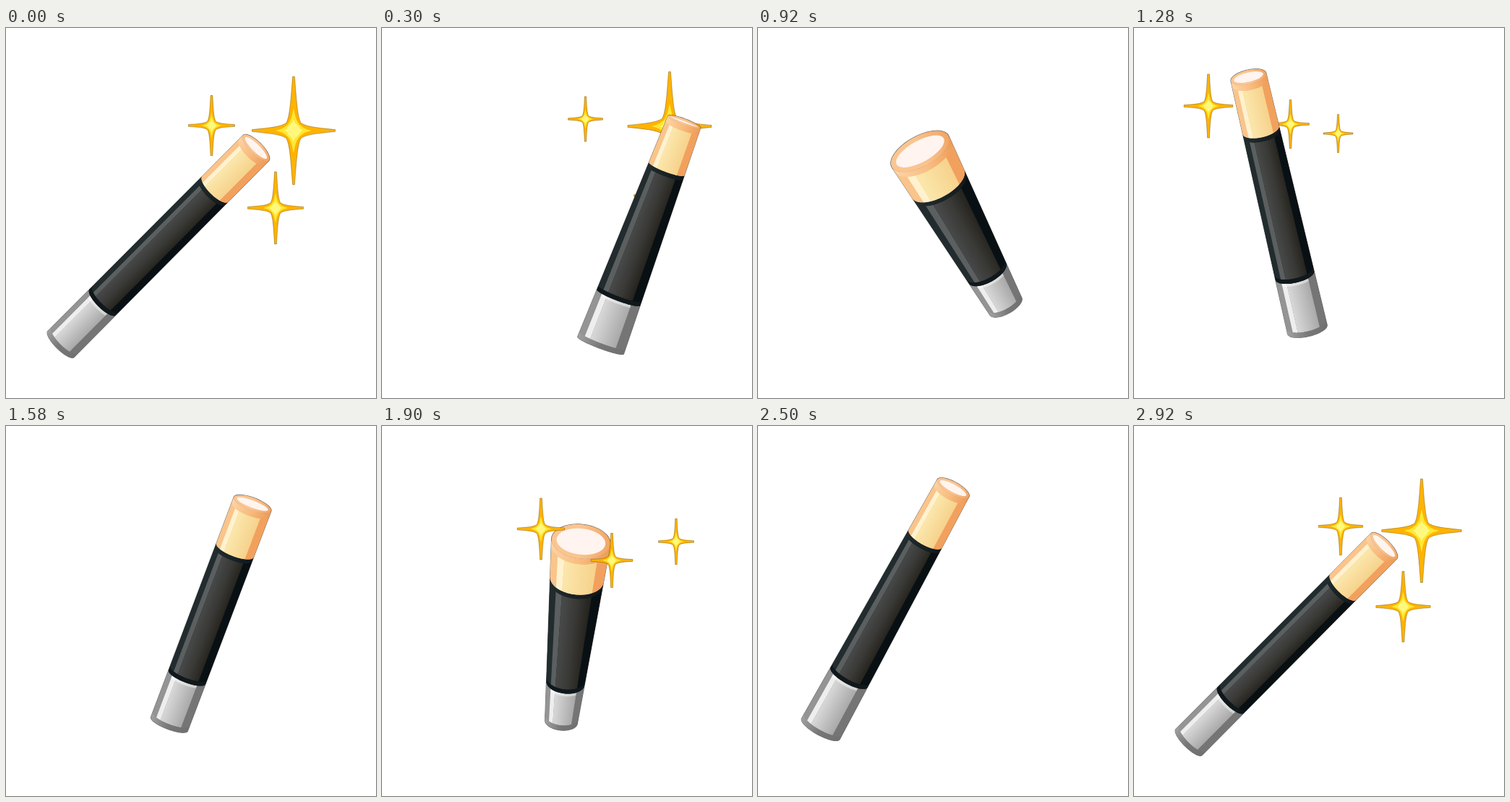
An HTML page with a canvas that plays this animation: 512x512 px, repeating every 2940 ms.

```html
<!DOCTYPE html>
<html lang="en">
<head>
<meta charset="utf-8">
<title>Magic wand</title>
<style>
html, body { margin: 0; width: 100%; height: 100%; overflow: hidden; background: #fff; }
canvas { display: block; width: 512px; height: 512px; }
</style>
</head>
<body>
<canvas id="stage"></canvas>
<script>
const LOOP = 2940;
const canvas = document.getElementById('stage');
const ctx = canvas.getContext('2d');
const dpr = window.devicePixelRatio || 1;
canvas.width = canvas.height = 512 * dpr;

// time, tip x, tip y, tip radius, base x, base y, base radius, ellipse ratio
const REST = [346, 166, 25, 76, 437.5, 25.5, 0.35];
const WAND = [
  [0, ...REST],
  [300, 418, 130, 24, 302, 439, 34, 0.18],
  [400, 441, 142, 28, 328, 444, 33, 0.25],
  [560, 392, 185, 38, 345, 405, 25, 0.42],
  [740, 305, 205, 46, 352, 385, 25, 0.52],
  [920, 225, 171, 45, 343, 385, 25, 0.47],
  [1080, 112, 108, 32, 295, 402, 26, 0.42],
  [1280, 158, 68, 25, 240, 417, 28, 0.4],
  [1600, 350, 112, 28, 226, 412, 27, 0.32],
  [1740, 362, 162, 36, 240, 408, 24, 0.48],
  [1900, 276, 160, 41, 248, 409, 22.5, 0.58],
  [2160, 95, 130, 33, 160, 428, 28, 0.42],
  [2500, 269.5, 86, 25, 87, 419, 30, 0.35],
  [2700, 362, 178, 25, 72, 442, 26, 0.33],
  [2860, ...REST],
  [LOOP, ...REST]
];

// time, x, y, half width; times past the loop wrap to its start
const BACK = [
  [[2680, 398, 160, 0], [2920, 398, 145, 55], [2940, 398, 142, 57.5], [3240, 398, 136, 58], [3480, 398, 133, 0]],
  [[2720, 288, 150, 0], [2920, 286, 139, 30.5], [2940, 284.5, 135, 32], [3240, 281.5, 126, 24], [3420, 280, 122, 0]],
  [[2700, 373, 256, 0], [2920, 372.5, 250, 37.5], [2940, 373, 249, 38.5], [3240, 373, 232, 24.5], [3400, 373, 227, 0]],
  [[940, 284, 156, 0], [1060, 284, 152, 30], [1280, 282.5, 146, 20.5], [1430, 282, 142, 0]],
  [[1000, 217, 142, 0], [1130, 217, 138, 32], [1280, 216.5, 133, 26], [1480, 216, 128, 0]],
  [[1090, 103, 115, 0], [1200, 103, 111, 40], [1280, 103, 108, 34], [1560, 103, 101, 0]]
];
const FRONT = [
  [[1660, 408, 168, 0], [1760, 407, 165, 29], [1900, 407, 160, 24.5], [2240, 406, 152, 0]],
  [[1760, 318, 192, 0], [1850, 318, 188, 31], [1900, 318, 186, 29], [2280, 317, 178, 0]],
  [[1820, 220, 146, 0], [1900, 220, 142.5, 32.5], [1960, 220, 140, 34], [2340, 219, 130, 0]]
];

// Smooth path through the keys, standing still at turning points
function sample(keys, t) {
  const last = keys.length - 1;
  let i = 0;
  while (i < last - 1 && t > keys[i + 1][0]) i++;
  const a = keys[i], b = keys[i + 1], span = b[0] - a[0];
  const x = (t - a[0]) / span, x2 = x * x, x3 = x2 * x;
  const slope = (j, c) => {
    if (j === 0 || j === last) return 0;
    const p = keys[j - 1], q = keys[j], r = keys[j + 1];
    if ((q[c] - p[c]) * (r[c] - q[c]) <= 0) return 0;
    return (r[c] - p[c]) / (r[0] - p[0]);
  };
  return a.slice(1).map((v, n) => {
    const c = n + 1;
    return (2 * x3 - 3 * x2 + 1) * v + (3 * x2 - 2 * x3) * b[c] +
      span * ((x3 - 2 * x2 + x) * slope(i, c) + (x3 - x2) * slope(i + 1, c));
  });
}

function star(w, h, cx, cy, tip, fill) {
  ctx.beginPath();
  ctx.moveTo(tip, -h);
  for (let q = 0; q < 4; q++) {
    const sx = q === 0 || q === 1 ? 1 : -1;
    const sy = q === 0 || q === 3 ? -1 : 1;
    const upright = [[tip, h], [cx * 0.4, h * 0.5], [cx * 0.55, cy * 1.7], [cx, cy]];
    const flat = [[cx, cy], [cx * 1.7, cy * 0.55], [w * 0.5, cy * 0.4], [w, tip]];
    let arcs = [upright, flat];
    if (q % 2) arcs = [flat.slice().reverse(), upright.slice().reverse()];
    for (const arc of arcs) {
      const p = arc.map(([x, y]) => [x * sx, y * sy]);
      ctx.lineTo(...p[0]);
      ctx.bezierCurveTo(...p[1], ...p[2], ...p[3]);
    }
  }
  ctx.closePath();
  ctx.fillStyle = fill;
  ctx.fill();
}

function sparkle(keys, t) {
  const end = keys[keys.length - 1][0];
  if (t + LOOP < end) t += LOOP;
  if (t <= keys[0][0] || t >= end) return;
  const [x, y, w] = sample(keys, t);
  if (w < 0.5) return;
  const h = w * 1.3;
  ctx.save();
  ctx.translate(x, y);
  star(w, h, w * 0.18, h * 0.14, Math.min(1.4, w * 0.05), '#ffb300');
  ctx.strokeStyle = 'rgba(90, 60, 0, .55)';
  ctx.lineWidth = 0.7;
  ctx.stroke();
  star(w * 0.42, h * 0.4, w * 0.14, h * 0.11, 0.3, '#ffe733');
  star(w * 0.22, h * 0.2, w * 0.11, h * 0.085, 0.3, '#fff87e');
  ctx.restore();
}

// Angles around the barrel where one strip meets the next
const EDGE = Math.PI / 2, SHINE = -0.83, BODY = -0.52, SHADE = 0.67;

function wand(t) {
  const [tx, ty, rt, bx, by, rb, k] = sample(WAND, t);
  const len = Math.hypot(tx - bx, ty - by);
  const ax = (tx - bx) / len, ay = (ty - by) / len;
  const nx = -ay, ny = ax;
  const mix = (a, b, s) => a + (b - a) * s;

  const point = (s, angle, size = 1, ratio = k - 0.05 * (1 - s)) => {
    const r = mix(rb, rt, s) * size;
    const across = r * Math.sin(angle), along = -r * ratio * Math.cos(angle);
    return [mix(bx, tx, s) + nx * across + ax * along,
            mix(by, ty, s) + ny * across + ay * along];
  };
  const shape = (points, fill) => {
    ctx.beginPath();
    points.forEach(p => ctx.lineTo(...p));
    ctx.closePath();
    ctx.fillStyle = fill;
    ctx.fill();
  };
  const arc = (s, from, to, ...rest) =>
    Array.from({ length: 33 }, (_, i) => point(s, mix(from, to, i / 32), ...rest));
  const patch = (s0, s1, from, to, fill) =>
    shape([...arc(s0, from, to), ...arc(s1, to, from)], fill);
  const shade = (s, from, to, ...colors) => {
    const g = ctx.createLinearGradient(...point(s, from, 1, 0), ...point(s, to, 1, 0));
    colors.forEach((c, i) => g.addColorStop(i / (colors.length - 1), c));
    return g;
  };
  const section = (s0, s1, in0, in1, c) => {
    const p0 = s0 + in0 / len, p1 = s1 - in1 / len, mid = (s0 + s1) / 2;
    patch(s0, s1, -EDGE, EDGE, shade(mid, -EDGE, EDGE, c.left, c.right));
    patch(p0, p1, -EDGE, SHINE, c.left);
    patch(p0, p1, SHADE, EDGE, c.right);
    patch(p0, p1, SHINE, BODY, c.shine);
    patch(p0, p1, BODY, SHADE, shade(mid, BODY, SHADE, ...c.body));
  };

  const low = 0.213, high = 0.79;
  // Hairline around the silhouette
  shape([...arc(0, -EDGE, EDGE), ...arc(1, EDGE, 3 * EDGE)], '#777');
  ctx.strokeStyle = 'rgba(40, 40, 40, .65)';
  ctx.lineWidth = 1.2;
  ctx.stroke();

  section(0, low, 7, 0, {
    left: '#949494', shine: '#eeeeee', body: ['#d8d8d8', '#a9a9a9'], right: '#757575'
  });
  patch(0, 7 / len, -EDGE, EDGE, shade(0, -EDGE, EDGE, '#a0a0a0', '#777777', '#707070'));
  patch(low - 4 / len, low, SHINE, SHADE, 'rgba(255, 255, 255, .45)');
  section(low, high, 6, 6, {
    left: '#222c2f', shine: '#5b5f5f', body: ['#474949', '#3a3a37', '#27251f'], right: '#091014'
  });
  patch(low, low + 6 / len, -EDGE, EDGE, '#10181b');
  patch(high - 6 / len, high, -EDGE, EDGE, shade(high, -EDGE, EDGE, '#222c2f', '#10181b'));
  section(high, 1, 0, 8, {
    left: '#fac48b', shine: '#fff2cf', body: ['#fbe7ac', '#f6d28c'], right: '#f1a15d'
  });
  patch(1 - 8 / len, 1, -EDGE, EDGE, shade(1, -EDGE, EDGE, '#fcd3a4', '#f8bd80', '#ee9b57'));

  shape(arc(1, 0, 4 * EDGE), shade(1, -EDGE, EDGE, '#fbc591', '#f9c48f', '#f2a564'));
  shape(arc(1, 0, 4 * EDGE, 0.83, Math.max(0.01, k - 0.14) / 0.83), '#fff4ef');
}

function draw(now) {
  const t = now % LOOP;
  ctx.setTransform(dpr, 0, 0, dpr, 0, 0);
  ctx.fillStyle = '#fff';
  ctx.fillRect(0, 0, 512, 512);
  BACK.forEach(s => sparkle(s, t));
  wand(t);
  FRONT.forEach(s => sparkle(s, t));
}

const start = performance.now();
function tick() {
  draw(Math.max(0, performance.now() - start));
  requestAnimationFrame(tick);
}
tick();
</script>
</body>
</html>
```
